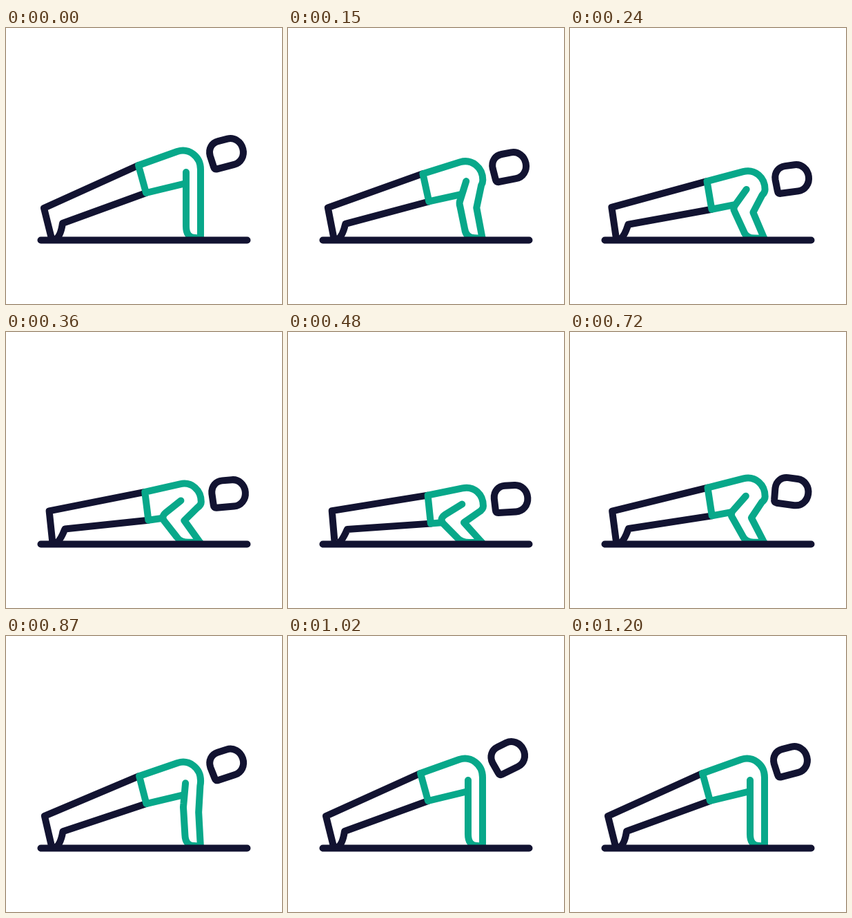
Animation of 400x400 px, one loop 2230 ms. Source, as an HTML page:

```html
<!DOCTYPE html>
<html lang="en">
<head>
<meta charset="utf-8">
<title>Push-up</title>
<style>
  html, body { margin: 0; height: 100%; overflow: hidden; background: #fff; }
  svg { display: block; width: 100%; height: 100%; }
  path { fill: none; stroke: #121331; stroke-width: 10; stroke-linecap: round; stroke-linejoin: round; }
  .shirt { stroke: #08a88a; }
</style>
</head>
<body>
<svg viewBox="0 0 400 400">
  <path id="legs"/>
  <path id="torso" class="shirt"/>
  <path id="arm" class="shirt"/>
  <path id="head" d="M-23.5 15L-24.5 -2C-24.5 -13 -17 -19.5 -8 -19.5H6C16 -19.5 24 -11 24 0C24 11 16 19 6 19H-19.5Q-23.5 19 -23.5 15Z"/>
  <path d="M50.5 307.5H349.5"/>
</svg>
<script>
const LOOP = 2230, STEP = 30;

// Each limb: path with arms straight, path with chest lowered
const limbs = {
  legs: [
    'M192 199L55 261L65.5 303Q67 308 71 306.5Q79 303 82 283L203 239',
    'M203 238L64 259L67.5 303Q68 308 72 306.5Q78 304 86 286L207 279'
  ],
  torso: [
    'M261 225L203 239L192 199L248 179C265 173.5 282 186 282 205Q282 209 282 212L282 253L282 305',
    'M221 278L207 279L203 238L253 228C270 224.5 283 237 283 254Q283 259 276 263L254 277L281 305'
  ],
  arm: [
    'M261 209L261 240Q261 245 261 250L261 287Q261 304 274 304L282 305',
    'M252 251L226 266Q217.5 272 224 279L245 299Q251 305 262 305L281 305'
  ]
};

const mix = (a, b, k) => a + (b - a) * k;

// Bezier ease with flat ends; a and b are the horizontal handle positions
function ease(u, a = 0.33, b = 0.33) {
  if (u <= 0) return 0;
  if (u >= 1) return 1;
  let lo = 0, hi = 1, s;
  for (let i = 0; i < 24; i++) {
    s = (lo + hi) / 2;
    const x = 3 * s * (1 - s) ** 2 * a + 3 * s * s * (1 - s) * b + s ** 3;
    if (x < u) lo = s; else hi = s;
  }
  return s * s * (3 - 2 * s);
}

function lowering(t) {
  return t < 600 ? ease(t / 600, 0.25, 0.34) : 1 - ease((t - 600) / 400, 0.37, 0.32);
}

// The head lags on the way up, overshoots, then settles
function nod(t) {
  if (t < 720) return 14.5 * ease((t - 600) / 120);
  if (t < 1000) return mix(14.5, -12, ease((t - 720) / 280, 0.33, 0.4));
  return mix(-12, 0, ease((t - 1000) / 200));
}

function blend([up, down], k) {
  const ends = down.match(/[\d.]+/g);
  let i = 0;
  return up.replace(/[\d.]+/g, n => mix(+n, +ends[i++], k).toFixed(2));
}

const byId = id => document.getElementById(id);

function draw(now) {
  const t = Math.floor(now % LOOP / STEP) * STEP;
  const k = lowering(t);
  for (const id in limbs) byId(id).setAttribute('d', blend(limbs[id], k));
  byId('head').setAttribute('transform',
    `translate(${mix(320, 323.5, k)} ${mix(181, 244, k)}) rotate(${nod(t)} -30 0) rotate(${mix(-14.6, -3, k)})`);
}

let start;
function tick(now) {
  start ??= now;
  draw(now - start);
  requestAnimationFrame(tick);
}
draw(0);
requestAnimationFrame(tick);
</script>
</body>
</html>
```
